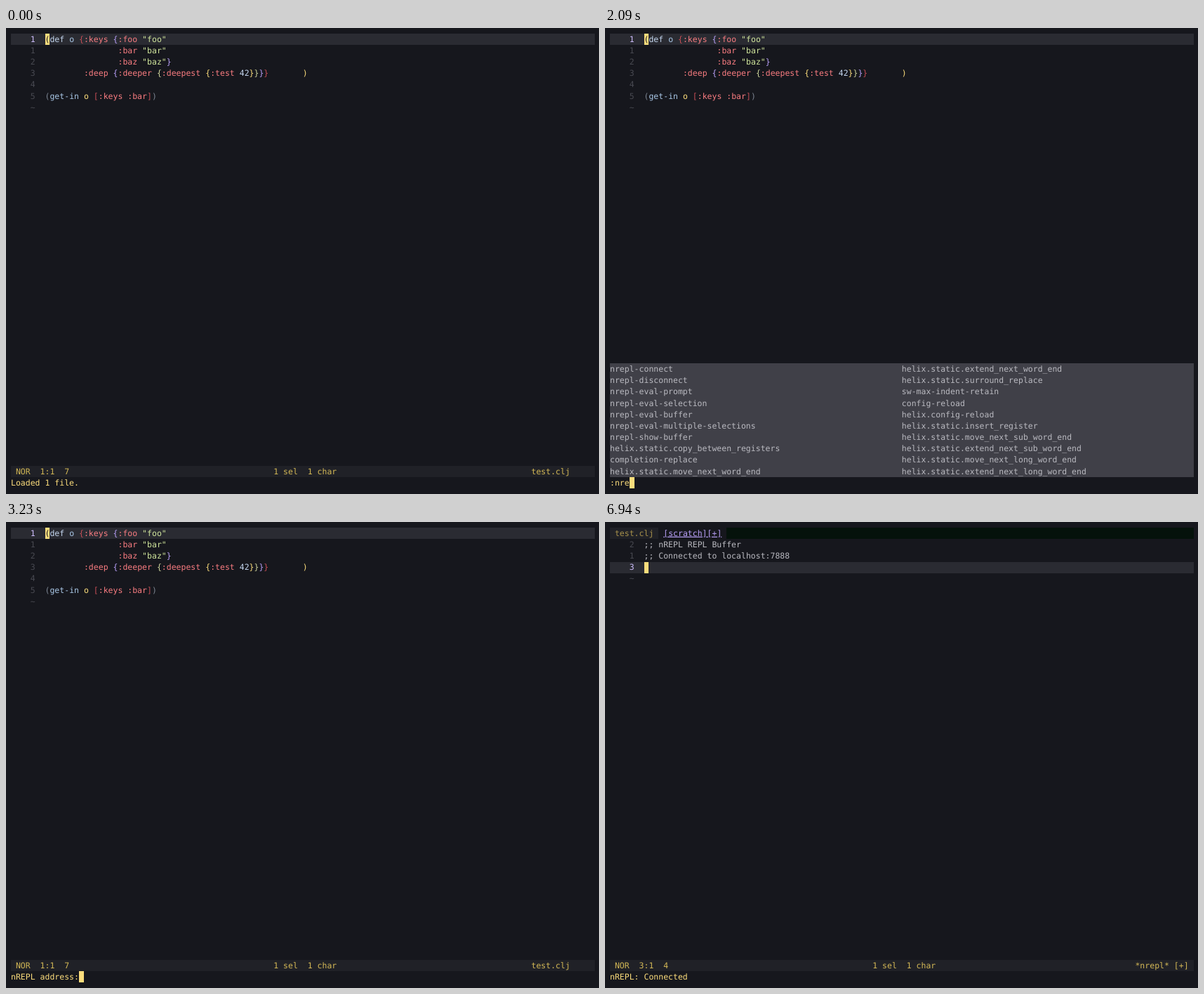
These frames come from a looping animation (845x663 px, 8000 ms). An HTML page:

```html
<!DOCTYPE html>
<html lang="en">
<head>
<meta charset="utf-8">
<title>Editor session</title>
<style>
  html, body { margin: 0; width: 100%; height: 100%; overflow: hidden; background: #16171d; }
  svg { display: block; width: 845px; height: 663px; }
  text {
    font: 11.51px "DejaVu Sans Mono", monospace;
    white-space: pre;
    text-rendering: geometricPrecision;
  }
  rect { shape-rendering: crispEdges; }
</style>
</head>
<body>
<svg id="stage" viewBox="0 0 845 663"></svg>
<script>
const LOOP = 8000, CW = 6.93, RH = 16.18, X0 = 7, Y0 = 8, COLS = 120;
const C = {
  bg: '#16171d', line: '#2a2b32', bar: '#202127', menu: '#404048', pick: '#56565a',
  text: '#b9b9c0', yellow: '#fcdd7c', status: '#d3b856', dim: '#484951', violet: '#b8a0f8',
  num: '#cdbdfb', red: '#c34d55', key: '#f87c80', str: '#d0e59c', blue: '#a9c7e6',
  pale: '#c3d5ee', gray: '#7d8592', green: '#cdd49a', tabs: '#05120b', tab: '#a8924b'
};
const stage = document.getElementById('stage');
const px = c => X0 + c * CW;
const py = r => Y0 + r * RH;

const box = (r, c, w, h, fill) =>
  `<rect x="${px(c).toFixed(2)}" y="${py(r).toFixed(2)}" width="${(w * CW).toFixed(2)}" height="${(h * RH).toFixed(2)}" fill="${fill}"/>`;
const put = (r, c, s, fill, more = '') =>
  `<text x="${px(c).toFixed(2)}" y="${(py(r) + 11.75).toFixed(2)}" fill="${fill}" ${more}>${s}</text>`;
const BOLD = 'font-weight="bold"', ITALIC = 'font-style="italic"';

// Alternating text and colour name, laid out from one column.
function spans(r, c, ...parts) {
  let out = '';
  for (let i = 0; i < parts.length; i += 2) {
    out += put(r, c, parts[i], C[parts[i + 1]]);
    c += parts[i].length;
  }
  return out;
}

const cursor = (r, c) => box(r, c, 1, 1, C.yellow);
const statusBar = (pos, size, file, col) => box(38, 0, COLS, 1, C.bar) +
  put(38, 1, 'NOR', C.status) + put(38, 6, pos, C.status) + put(38, 11, size, C.status) +
  put(38, 54, '1 sel  1 char', C.status) + put(38, col, file, C.status);
const message = s => put(39, 0, s, C.yellow);
const prompt = s => message(s) + cursor(39, s.length);

const fileView = box(0, 0, COLS, 1, C.line) +
  put(0, 4, '1', C.num, BOLD) +
  [1, 2, 3, 4, 5, '~'].map((n, i) => put(i + 1, 4, n, C.dim)).join('') +
  cursor(0, 7) + put(0, 7, '(', C.bg) +
  spans(0, 8, 'def ', 'pale', 'o ', 'blue', '{', 'red', ':keys ', 'key', '{', 'violet', ':foo ', 'key', '"foo"', 'str') +
  spans(1, 22, ':bar ', 'key', '"bar"', 'str') +
  spans(2, 22, ':baz ', 'key', '"baz"', 'str', '}', 'violet') +
  spans(3, 15, ':deep ', 'key', '{', 'violet', ':deeper ', 'key', '{', 'green', ':deepest ', 'key',
    '{', 'yellow', ':test ', 'key', '42', 'pale', '}', 'yellow', '}', 'green', '}', 'violet', '}', 'red') +
  put(3, 60, ')', C.yellow, BOLD) +
  spans(5, 7, '(', 'gray', 'get-in ', 'blue', 'o ', 'yellow', '[', 'red', ':keys :bar', 'key', ']', 'red', ')', 'gray');
const fileStatus = statusBar('1:1', '7', 'test.clj', 107);

const replView = box(0, 0, COLS, 1, C.tabs) + box(0, 0, 10, 1, C.bar) + box(0, 10, 14, 1, C.bg) +
  put(0, 1, 'test.clj', C.tab) + put(0, 11, '[scratch][+]', C.violet, 'text-decoration="underline"') +
  put(1, 4, '2', C.dim) + put(2, 4, '1', C.dim) +
  put(1, 7, ';; nREPL REPL Buffer', C.text, ITALIC) +
  put(2, 7, ';; Connected to localhost:7888', C.text, ITALIC) +
  box(3, 0, COLS, 1, C.line) + put(3, 4, '3', C.num, BOLD) + cursor(3, 7) + put(4, 4, '~', C.dim) +
  statusBar('3:1', '4', '*nrepl* [+]', 108) + message('nREPL: Connected');

// Two-column completion list sitting on the prompt row.
function menu(list, rows, picked) {
  const top = 39 - rows;
  let out = box(top, 0, COLS, rows, C.menu);
  list.forEach((s, i) => {
    const r = top + i % rows, c = i < rows ? 0 : 60;
    if (i === picked) out += box(r, c, s.length, 1, C.pick) + put(r, c, s, C.yellow, BOLD);
    else out += put(r, c, s, C.text);
  });
  return out;
}

// Framed help panel, 90 columns wide, ending above the row `end`.
function help(lines, end) {
  const top = end - lines.length - 2, l = px(0.5), r = px(89.5), mid = RH / 2;
  const y1 = py(top) + mid, y2 = py(end) - mid;
  let d = `M${l} ${y1 + mid - .5}V${y1}H${r}V${y1 + mid - .5}M${l} ${y2 - mid + .5}V${y2}H${r}V${y2 - mid + .5}`;
  let out = box(top, 0, 90, lines.length + 2, C.menu);
  lines.forEach((s, i) => {
    const y = py(top + 1 + i);
    for (const x of [l, r]) d += `M${x} ${y + .5}V${y + RH - .5}`;
    out += put(top + 1 + i, 2, s, C.text);
  });
  return out + `<path d="${d}" fill="none" stroke="${C.text}" stroke-width="1"/>`;
}

const words = s => s.trim().split(/\s+/);
const stat = s => words(s).map(w => 'helix.static.' + w);

const general = words(`quit quit! open buffer-close buffer-close! buffer-close-others buffer-close-others!
  buffer-close-all buffer-close-all! buffer-next buffer-previous write write! write-buffer-close
  write-buffer-close! new format indent-style line-ending earlier`);
const nrepl = words(`nrepl-connect nrepl-disconnect nrepl-eval-prompt nrepl-eval-selection nrepl-eval-buffer
  nrepl-eval-multiple-selections nrepl-show-buffer`);
const listN = ['new', ...nrepl, 'buffer-next', 'line-ending',
  ...stat(`no_op normal_mode move_next_word_start move_next_word_end extend_next_word_start
    extend_next_word_end goto_next_buffer goto_next_paragraph search_next extend_search_next`)];
const listNre = [...nrepl, ...stat('copy_between_registers'), 'completion-replace',
  ...stat('move_next_word_end extend_next_word_end surround_replace'),
  'sw-max-indent-retain', 'config-reload', 'helix.config-reload',
  ...stat(`insert_register move_next_sub_word_end extend_next_sub_word_end
    move_next_long_word_end extend_next_long_word_end`)];
const listNrep = [...nrepl, 'completion-replace',
  ...stat(`surround_replace signature_help syntax_workspace_symbol_picker
    lsp_or_syntax_workspace_symbol_picker extend_to_first_nonwhitespace`)];

const newHelp = ['Create a new scratch buffer.', 'Aliases: n'];
const connectHelp = ['Connect to an nREPL server', '', 'Usage: :nrepl-connect [address]', '',
  'Prompts for server address (e.g., "localhost:7888") if not provided and connects.',
  'Creates a session and displays the *nrepl* buffer.'];

const scenes = [
  [0, fileView + fileStatus + message('Loaded 1 file.')],
  [1120, fileView + fileStatus + message('clojure-lsp: Project analysis skipped, no deps.edn file was found')],
  [1650, fileView + menu(general, 10) + prompt(':')],
  [1770, fileView + menu(listN, 10) + help(newHelp, 29) + prompt(':n')],
  [2000, fileView + menu(listNre, 10) + prompt(':nr')],
  [2090, fileView + menu(listNre, 10) + prompt(':nre')],
  [2380, fileView + menu(listNrep, 7) + prompt(':nrep')],
  [2650, fileView + menu(listNrep, 7, 0) + help(connectHelp, 32) + prompt(':nrepl-connect')]
];
const address = 'localhost:7888';
[3230, 3780, 3880, 3970, 4110, 4180, 4320, 4420, 4520, 4660, 4820, 5290, 5450, 5620, 5740].forEach((t, n) =>
  scenes.push([t, fileView + fileStatus + prompt('nREPL address:' + address.slice(0, n))]));
scenes.push([6940, replView]);

const backdrop = `<rect width="845" height="663" fill="${C.bg}"/>`;
let shown = -1;
function draw(ms) {
  const t = ms % LOOP;
  let i = scenes.length - 1;
  while (scenes[i][0] > t) i--;
  if (i !== shown) {
    stage.innerHTML = backdrop + scenes[i][1];
    shown = i;
  }
}

const start = performance.now();
function tick() {
  draw(performance.now() - start);
  requestAnimationFrame(tick);
}
tick();
</script>
</body>
</html>
```
